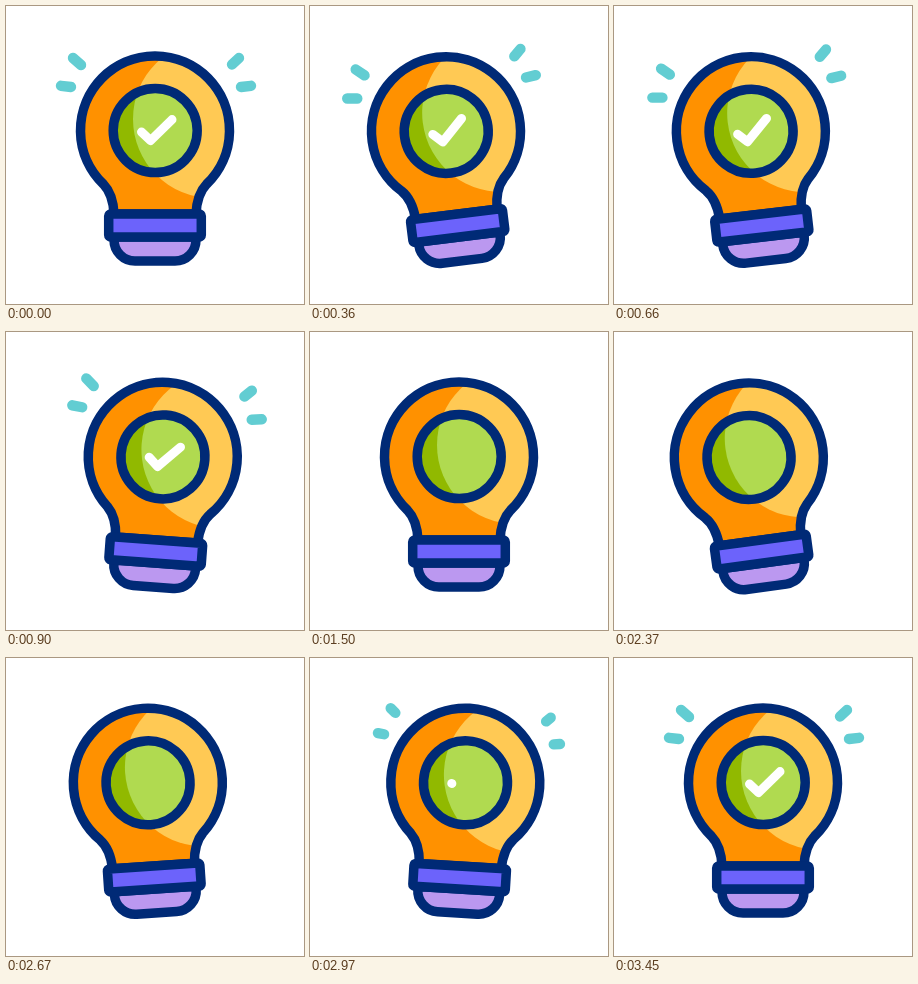
Recreate the animation shown at these times as an HTML page. Size 298 px wide and 298 px high, loop 3.78 s.

```html
<!DOCTYPE html>
<html lang="en">
<head>
<meta charset="utf-8">
<title>Light bulb</title>
<style>
  html, body { margin: 0; width: 100%; height: 100%; overflow: hidden; background: #fff; }
  svg { display: block; width: 100vw; height: 100vh; }
  .outline { fill: none; stroke: #002a76; stroke-width: 9.5; stroke-linejoin: round; }
  .ray, #check { fill: none; stroke: #62cdd2; stroke-width: 10.4; stroke-linecap: round; stroke-linejoin: round; }
  #check { stroke: #fff; stroke-width: 9; }
</style>
</head>
<body>
<svg viewBox="0 0 298 298">
  <defs>
    <path id="glass" d="M108 208C107.5 198 105 186 97.5 178.3A74.5 74.5 0 1 1 200.5 178.3C193 186 190.5 198 190 208Z"/>
    <circle id="disc" cx="149.2" cy="124.6" r="42"/>
    <circle id="shine" cx="206" cy="113" r="79"/>
    <path id="cap" d="M108 231V234A21 21 0 0 0 129 255H169A21 21 0 0 0 190 234V231Z"/>
    <rect id="band" x="102.7" y="208" width="92.6" height="23" rx="2"/>
    <clipPath id="inGlass"><use href="#glass"/></clipPath>
    <clipPath id="inDisc"><use href="#disc"/></clipPath>
  </defs>
  <g id="bulb">
    <path class="ray" pathLength="1" d="M75 59L67 52"/>
    <path class="ray" pathLength="1" d="M65 81L55 79.8"/>
    <path class="ray" pathLength="1" d="M226 58.5L233 52"/>
    <path class="ray" pathLength="1" d="M235 81L245 79.8"/>

    <use href="#glass" fill="#ff9100"/>
    <use href="#shine" fill="#ffc954" clip-path="url(#inGlass)"/>
    <use href="#glass" class="outline"/>
    <use href="#disc" fill="#91b900"/>
    <use href="#shine" fill="#b0da50" clip-path="url(#inDisc)"/>
    <use href="#disc" class="outline"/>
    <use href="#cap" fill="#bb98f0"/>
    <use href="#cap" class="outline"/>
    <use href="#band" fill="#6c63fb"/>
    <use href="#band" class="outline"/>
    <path id="check" pathLength="1" d="M135.5 126L144.5 134.6L166 113.6"/>
  </g>
</svg>
<script>
  const LOOP = 3780, SECOND = 1950;
  const bulb = document.getElementById('bulb');
  const check = document.getElementById('check');
  const rays = document.querySelectorAll('.ray');

  // [ms, degrees] of one wobble
  const swing = [[0, 0], [450, -7.8], [585, -8], [935, 4.5], [1200, 0]];

  const ease = p => (1 - Math.cos(Math.PI * p)) / 2;
  const progress = (t, from, to) => ease(Math.min(1, Math.max(0, (t - from) / (to - from))));

  function angleAt(t) {
    let angle = 0;
    for (let i = 1; i < swing.length; i++) {
      const [t0, a0] = swing[i - 1], [t1, a1] = swing[i];
      angle += (a1 - a0) * progress(t, t0, t1);
    }
    return angle;
  }

  // Shows only the stretch of a stroke between two fractions of its length.
  function trim(path, start, end) {
    path.style.visibility = end - start > 0.001 ? 'visible' : 'hidden';
    path.style.strokeDasharray = `${end - start} 9`;
    path.style.strokeDashoffset = -start;
  }

  function draw(now) {
    const time = now % LOOP;
    const leaving = time < SECOND;
    const t = leaving ? time : time - SECOND;
    bulb.setAttribute('transform', `rotate(${angleAt(t)} 149 230)`);

    if (leaving) {
      rays.forEach(ray => trim(ray, progress(t, 1110, 1470), 1));
      trim(check, progress(t, 1080, 1500), 1);
    } else {
      rays.forEach(ray => trim(ray, 0, progress(t, 860, 1140)));
      trim(check, 0, progress(t, 1000, 1500));
    }
  }

  const begin = performance.now();
  function tick() {
    draw(performance.now() - begin);
    requestAnimationFrame(tick);
  }
  tick();
</script>
</body>
</html>
```
